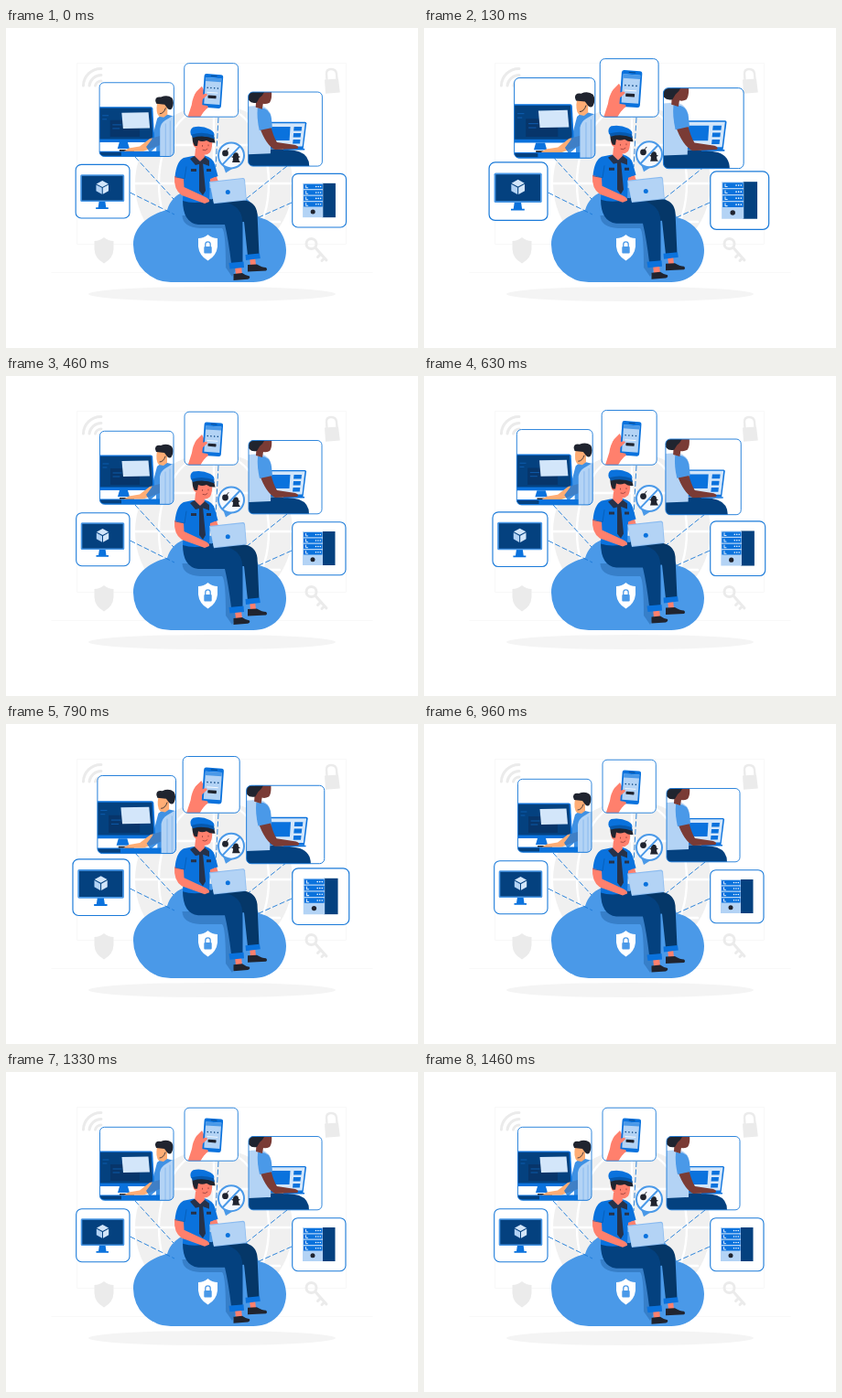
Recreate the animation shown at these times as an HTML page. Size 450 px wide and 350 px high, loop 1.5 s.

```html
<!DOCTYPE html>
<html lang="en">
<head>
<meta charset="utf-8">
<style>
  html, body { margin: 0; width: 100%; height: 100%; overflow: hidden; background: #fff; }
  svg { display: block; width: 100vw; height: 100vh; }
  .blue { fill: #0a72dd; }
  .mid { fill: #4a99e8; }
  .pale { fill: #b3d3f5; }
  .ice { fill: #d3e6fa; }
  .navy { fill: #04417f; }
  .dark { fill: #20242f; }
  .coral { fill: #ff806d; }
  .peach { fill: #ffad75; }
  .brown { fill: #7a3b35; }
  .white { fill: #fff; }
  .gray { fill: #ebebeb; }
  .line { fill: none; stroke-linecap: round; stroke-linejoin: round; }
  .frame { fill: none; stroke: #1a7ad9; stroke-width: .9; }
  .filled { fill: #fff; stroke-width: 1.1; }
</style>
</head>
<body>
<svg viewBox="0 0 450 350">
  <defs>
    <clipPath id="clipDesk"><rect x="102.5" y="60.3" width="80.5" height="80" rx="5"/></clipPath>
    <clipPath id="clipPhone"><rect x="195" y="39.2" width="58.3" height="58" rx="5"/></clipPath>
    <clipPath id="clipOffice"><rect x="265" y="70.5" width="80" height="80.3" rx="5"/></clipPath>
  </defs>

  <!-- backdrop -->
  <path class="line" stroke="#f8f8f8" d="M78 38.500H371.500V236.500H78ZM50 267.500H400"/>
  <circle cx="227" cy="170" r="86" fill="#f0f0f0"/>
  <g class="line" stroke="#fff" stroke-width="2.4">
    <path d="M141 170H313M155 128H299M155 212H299M227 84V256"/>
    <ellipse cx="227" cy="170" rx="60" ry="86"/>
  </g>
  <g class="line" stroke="#ebebeb" stroke-width="3">
    <path d="M84.500 63A19 19 0 0 1 104 44.500M91 63A13 13 0 0 1 104 51.500M97.500 63A6.500 6.500 0 0 1 104 58"/>
    <path stroke-width="2.400" d="M350.500 57L350 50Q350 45 355 45Q360.500 45 361 50L361.500 56"/>
    <circle cx="333.500" cy="236" r="5.500"/>
    <path d="M338 240.500L350 254M344 247L340.500 250.500M348 251.500L345 254.500"/>
  </g>
  <path class="gray" d="M348 56.500L363 55.500L364.800 70.500L349 71.800Z"/>
  <path class="gray" d="M107 229Q112 233 117.500 233V242Q117 252 107 257.500Q97 252 96.500 242V233Q102 233 107 229Z"/>
  <ellipse cx="225" cy="291" rx="135" ry="8" fill="#f4f4f4"/>

  <!-- cloud -->
  <path class="mid" d="M181 278A41 41 0 0 1 139 237C139 218 155 204 176 199C183 178 203 174 226 175C252 175 268 185 276 207C294 211 306 226 306 243C306 263 291 278 270 278Z"/>
  <path fill="none" stroke="#1a7ad9" stroke-width=".9" stroke-dasharray="6 2.500" d="M141 141L183 187M232 98L229 152M307 151L262 187M135.500 180L184 204M312 191L274 208"/>
  <path fill="#377fc9" d="M192.500 205Q193 218 212 219H236Q240 222 240 262L247 272L252 262L250 205Z"/>
  <path class="white" d="M220.500 226Q225 230 231 230V239Q230 249 220.500 254.500Q211 249 210 239V230Q216 230 220.500 226Z"/>
  <path class="line" stroke="#4a99e8" stroke-width="1.300" d="M217.800 240V236.500A2.700 2.700 0 0 1 223.200 236.500V240"/>
  <rect class="mid" x="216.300" y="239" width="8.400" height="7.600" rx="1"/>

  <!-- cards -->
  <g class="card" data-pivot="143 120">
    <g clip-path="url(#clipDesk)">
      <path class="white" d="M102 60H184V141H102Z"/>
      <path class="blue" d="M102 86.500H158Q160 86.500 160.200 88.500L162 123Q162 125 160 125H102Z"/>
      <path class="navy" d="M102 87.800H158.500L160.300 121.500H102Z"/>
      <path class="blue" d="M124 125H133L135 132H122Z"/>
      <path fill="#07356a" d="M114 101H146V119H114Z"/>
      <path class="line" stroke="#0f62b8" stroke-width=".8" d="M117 106H126M117 110H124M106 96H112M106 100H110"/>
      <path class="ice" d="M126.500 93L155.500 92.500L157 109.500L128 110Z"/>
      <path class="blue" d="M102 134.500H184V141H102Z"/>
      <path class="navy" d="M102 135.500H126V139.500H102Z"/>
      <path class="dark" d="M124 133H140V134.600H124Z"/>
      <path class="peach" d="M168 118L157 121L146 129.500L134 131.500L129 134.500H150L168 128Z"/>
      <path class="blue" fill-opacity=".78" d="M165 99Q169 95 176 95L184 97V141H164L164 130L157 136L153 130L159 122Z"/>
      <path class="pale" d="M168 110Q169 104 174 101L184 95V141H168Z"/>
      <path class="line" stroke="#82b5ec" stroke-width=".8" d="M174 105V140M179 102V140"/>
      <path class="peach" d="M165 82Q163 93 167 97L172 98L176 95V82Z"/>
      <path class="dark" d="M163 80Q163 75 169 76Q176 73 181 77Q184 82 181 88Q179 91 176 88L173 84L164 83Z"/>
      <path class="line" stroke="#20242f" stroke-width=".8" d="M174 88Q172 94 168 94"/>
    </g>
    <rect class="frame" x="102.500" y="60.300" width="80.500" height="80" rx="5"/>
  </g>

  <g class="card" data-pivot="224 97">
    <g clip-path="url(#clipPhone)">
      <path class="white" d="M194 39H254V98H194Z"/>
      <path class="coral" d="M198.500 98L203 84Q204 76 208 70L214 64L218 72V88L212 98Z"/>
      <g transform="rotate(4 226 69)">
        <rect class="blue" x="215.500" y="51" width="20.500" height="36.500" rx="2.500"/>
        <rect class="pale" x="217.300" y="55" width="17" height="28.500"/>
        <path class="mid" d="M217.300 55H234.300V59H217.300Z"/>
        <path class="line" stroke="#04417f" stroke-width="1.500" stroke-dasharray="0 3.700" d="M220 66H233"/>
        <path class="line" stroke="#fff" stroke-width=".8" d="M220 71H231"/>
        <path class="line" stroke="#04417f" stroke-width=".8" d="M223 52.900H229"/>
        <rect class="dark" x="221" y="74" width="9" height="3.200" rx=".6"/>
      </g>
      <path class="coral" d="M207 72Q214 69 215 74L213.500 84L220 85Q222 87 219 88.500L212 96H203Z"/>
      <path class="coral" d="M213 74Q220 70 220 73.500L214 79Z"/>
    </g>
    <rect class="frame" x="195" y="39.200" width="58.300" height="58" rx="5"/>
  </g>

  <g class="card" data-pivot="302 121">
    <g clip-path="url(#clipOffice)">
      <path class="white" d="M264 70H346V151H264Z"/>
      <path class="blue" d="M287 103H326.500Q328 103 328 104.500L324.500 132H286Z"/>
      <path class="ice" d="M288 104.300H326.500L323.500 129.500H288Z"/>
      <path class="blue" d="M290 108H310.500L309.500 123H290ZM314.500 108H323L322.500 112.500H314ZM314 115H322L321.500 119.500H313.500ZM313.500 122H321.300L320.800 126.500H313Z"/>
      <path class="navy" d="M264 134Q300 130 320 135Q331 139 331 151H264Z"/>
      <path class="blue" d="M303 132H326V133.500H303Z"/>
      <path class="pale" d="M264 86L279 85Q288 88 290 97L289 137L264 138Z"/>
      <path class="brown" d="M277 108L289 106Q292 119 296 125L316 128Q321 130 318 132L294 133Q284 128 277 108Z"/>
      <path class="mid" d="M275 88Q288 86 290 99L291 109L277 112Q274 99 275 88Z"/>
      <path class="brown" d="M274 69H290Q291 78 288 82Q284 84 281 83L280 89L273 87Z"/>
      <path class="dark" d="M266 69H283Q281 74 277 77L274 82Q268 83 266 80Q262 76 266 69Z"/>
    </g>
    <rect class="frame" x="265" y="70.500" width="80" height="80.300" rx="5"/>
  </g>

  <g class="card" data-pivot="135 179">
    <rect class="frame filled" x="76.700" y="149.700" width="58.300" height="58" rx="6"/>
    <path class="blue" d="M102 189H108.500L109.500 196H112V197.800H98.500V196H101Z"/>
    <rect class="mid" x="81.700" y="160.300" width="47.600" height="29.700" rx="1.500"/>
    <path class="navy" d="M83.300 161.800H127.700V188.400H83.300Z"/>
    <path class="ice" d="M105.500 167L112 170.500L105.500 174L99 170.500Z"/>
    <path class="pale" d="M98.800 171.500L105 174.900V181.800L98.800 178.300Z"/>
    <path class="ice" d="M112.200 171.500L106 174.900V181.800L112.200 178.300Z"/>
  </g>

  <g class="card" data-pivot="312 189">
    <rect class="frame filled" x="312.700" y="159.700" width="58.300" height="58" rx="6"/>
    <path class="navy" d="M345 170H359.500V207H345Z"/>
    <path class="pale" d="M324 170H346V207H324Z"/>
    <g id="blades"></g>
    <circle class="dark" cx="335" cy="200.800" r="2.500"/>
  </g>

  <!-- guard -->
  <g id="guard">
    <path class="mid" d="M237 150L240 158.500L247 154Z"/>
    <circle cx="246" cy="139.500" r="14" fill="#f5f9fe" stroke="#4a99e8" stroke-width="2"/>
    <circle class="dark" cx="239.500" cy="137" r="3.400"/>
    <path class="line" stroke="#20242f" d="M241 134L243 131.500"/>
    <path class="dark" d="M248 140Q248 136 251 136.500Q254 136 254 140L256 141L254 142Q254 145 256 147H247Q248 145 248 142L246 141Z"/>
    <path class="line" stroke="#4a99e8" stroke-width="2" d="M236.500 149.500L255.500 129.500"/>

    <path class="coral" d="M266 250H272L273 260H267Z"/>
    <path class="dark" d="M264 259L274 258.500Q280 262 284 262Q286 264 284 265.500L264 266.500Z"/>
    <path fill="#053768" d="M225 187L259 188Q273 190 274.500 203L276.500 249H264L260 212L228 214Z"/>
    <path class="blue" d="M261.500 248L277 246.500L277.800 252L262 254Z"/>
    <path class="coral" d="M250 260H257L258 270H251Z"/>
    <path class="dark" d="M248.500 269L258 268Q262 271 266 271.500Q267 274 264 274.800L248.500 276Z"/>
    <path class="navy" d="M193 188L221 187Q248 190 254 199Q259 204 258.500 220L258.500 257H246Q243 232 239 215L210 215Q193 213 193 188Z"/>
    <path class="blue" d="M243.500 257L259.500 255.500L260 262L244.500 263.500Z"/>

    <path class="coral" d="M221 158L229 157L231 166L226 171L222 168Z"/>
    <path class="blue" d="M204 140L217 139.500Q226 142 228 149L231.500 162L223 165L222 189Q205 193 193 189L194 165L184.500 163Q186 146 194 142Z"/>
    <path class="coral" d="M184 162L194 165L194.500 174L216 184Q223 187 222 190L217 192L192 183Q183 177 184 162Z"/>
    <path class="line" stroke="#075bb2" stroke-width=".8" d="M197 152L195 165L185 163"/>
    <path class="coral" d="M207 132H216L217 142L212 146L206 142Z"/>
    <path class="navy" style="fill:#26324a" d="M201 143L206 140L212 146L217 141L222 145L222 151L214 148L207 150ZM211 147H215L218 178L215 183L211 178ZM202 154H208V157H202ZM219 154H224V157H219Z"/>
    <path class="coral" d="M206 119H225Q226 131 223 136Q218 141 211 137L207 131Q202 128 206 119Z"/>
    <path class="dark" d="M203.500 117L227 119L228.500 125.500Q223 126 219 123Q214 125 210 123L209 129H206Q203 124 203.500 117Z"/>
    <path class="line" stroke="#8f3b38" stroke-width=".8" d="M214.500 128.500V129.500M221 128V129M215 133.500Q218 135 220 132.500"/>
    <path class="blue" d="M202 117Q200 111 204.500 108.500Q214 106.500 223 111Q229 114 227 119Q215 115 204 119Z"/>
    <path fill="#0759ae" d="M203 116.500Q215 113 227 117.500L228 121.500Q216 116.500 204 120Z"/>
    <path class="coral" d="M223 166L228 163L232 167L228 171H223Z"/>
    <path fill="#8abbf0" d="M222 168L259 164Q260.500 164 261 166L262.700 187L262 188.500L227 192.300Z"/>
    <path class="pale" d="M222.800 169L258.500 165.200Q260 165.200 260.300 167L262 187.500L227 191.500Z"/>
    <circle class="blue" cx="242.300" cy="179.700" r="2.500"/>
  </g>
</svg>
<script>
  const LOOP = 1500, LEAD = 13, LIFT = 6.3;
  const cards = [...document.querySelectorAll('.card')];
  const guard = document.getElementById('guard');

  document.getElementById('blades').innerHTML = [171, 177.4, 183.8, 190.2].map(y => `
    <rect class="blue" x="325" y="${y}" width="20.500" height="5.200" rx=".5"/>
    <path class="line" stroke="#d3e6fa" stroke-width="1" d="M327.500 ${y + 1.3}v2.600h2"/>
    <path class="line" stroke="#fff" stroke-width="1.500" stroke-dasharray="0 2.400" d="M338.500 ${y + 2.6}h5"/>`).join('');

  // Linear interpolation over [position, value] stops.
  function track(stops, p) {
    const i = stops.findIndex(([at]) => at > p);
    const [a, from] = stops[i - 1], [b, to] = stops[i];
    return from + (to - from) * (p - a) / (b - a);
  }

  const heartbeat = [[0, 1], [.1, 1.1], [.3, 1], [.4, 1], [.5, 1.1], [.6, 1], [1, 1]];
  const floating = [[0, 0], [.5, -LIFT], [1, 0]];

  function draw(time) {
    const p = (time + LEAD) % LOOP / LOOP;
    const scale = track(heartbeat, p);
    for (const card of cards) {
      const [x, y] = card.dataset.pivot.split(' ');
      card.setAttribute('transform', `translate(${x} ${y}) scale(${scale}) translate(${-x} ${-y})`);
    }
    guard.setAttribute('transform', `translate(0 ${track(floating, p)})`);
  }

  const start = performance.now();
  function tick() {
    draw(performance.now() - start);
    requestAnimationFrame(tick);
  }
  tick();
</script>
</body>
</html>
```
